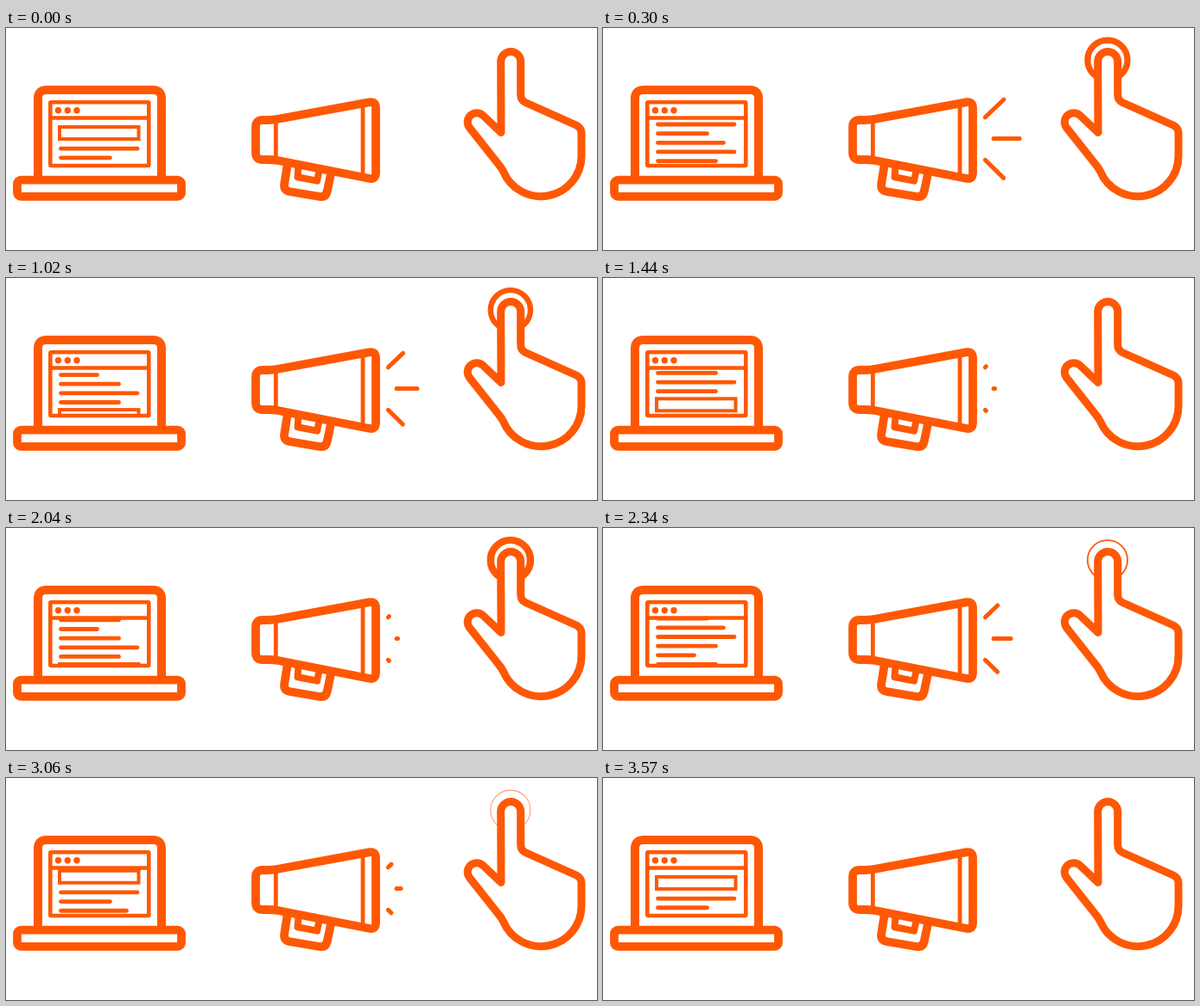
An HTML page that plays this animation: 684 px wide and 258 px high, repeating every 3.6 s.

```html
<!DOCTYPE html>
<html lang="en">
<head>
<meta charset="utf-8">
<title>Laptop, megaphone and tap</title>
<style>
  html, body { margin: 0; width: 100%; height: 100%; overflow: hidden; background: #fff; }
  svg { display: block; width: 684px; height: 258px; }
</style>
</head>
<body>
<svg viewBox="0 0 684 258" fill="none" stroke="#fe5804" stroke-linejoin="round">
  <clipPath id="screen"><rect x="53" y="105" width="111" height="54"/></clipPath>

  <g id="laptop">
    <path d="M37 176V82Q37 72 47 72H170Q180 72 180 82V176" stroke-width="10"/>
    <rect x="13" y="176.6" width="190" height="19.3" rx="4.5" stroke-width="9.8"/>
    <g clip-path="url(#screen)"><g id="page" stroke-width="4.8" stroke-linecap="round"></g></g>
    <rect x="51.3" y="86.3" width="114" height="73.7" rx="1" stroke-width="4.6"/>
    <path d="M51 104.5H165.5" stroke-width="4.6"/>
    <g fill="#fe5804" stroke="none">
      <circle cx="60.5" cy="95.7" r="3.7"/>
      <circle cx="71.3" cy="95.7" r="3.7"/>
      <circle cx="82" cy="95.7" r="3.7"/>
    </g>
  </g>

  <g id="megaphone">
    <path d="M326 157L322.2 181Q321 188.5 328 190L363 196Q370 197 371.7 190L376.3 168" stroke-width="9.8"/>
    <path d="M338.5 160L337.5 173.3L360 177.6L362.5 166" stroke-width="8"/>
    <path d="M297 107H303Q309 107 315 105.8L420 86.4Q428 85 428 93V168Q428 176.4 420 174.8L315 154Q309 153 303 153H297Q289 153 289 145V115Q289 107 297 107Z" fill="#fff" stroke-width="9.8"/>
    <path d="M312.3 106V154M413 88V173" stroke-width="4.8"/>
    <path id="rays" stroke-width="5" stroke-linecap="round"/>
  </g>

  <g id="tap">
    <g id="rings"></g>
    <path d="M572.7 39A11.5 11.5 0 0 1 595.7 39V77Q595.7 84 601 86.5L660 113Q666 116 666 122V148.7A47 47 0 0 1 575.6 166.7Q573.5 162.5 570.5 159L536.3 115.6A10.6 10.6 0 0 1 552 101.5L573 121.5Z" fill="#fff" stroke-width="9"/>
  </g>
</svg>
<script>
const STEP = 36, COUNT = 100, HALF = 50;
const $ = id => document.getElementById(id);

function add(parent, tag, attrs) {
  const el = document.createElementNS('http://www.w3.org/2000/svg', tag);
  for (const k in attrs) el.setAttribute(k, attrs[k]);
  return parent.appendChild(el);
}

// Page content: one box, then text lines of these right ends, repeated
const PAGE = 119, PITCH = 10.65, TRAVEL = 97;
const lineEnds = [152, 120.5, 139.5, 152, 130.5, 105.5, 130.5, 152, 130.5];
for (const top of [122, 122 + PAGE]) {
  add($('page'), 'rect', { x: 62, y: top - 7, width: 91.5, height: 14, 'stroke-width': 4, 'stroke-linejoin': 'miter' });
  lineEnds.forEach((x, i) => {
    const y = top + 18.2 + i * PITCH;
    add($('page'), 'path', { d: `M63.5 ${y}H${x}` });
  });
}

const rings = [0, 19].map(start => ({
  start, el: add($('rings'), 'circle', { cx: 583.9, cy: 37.2 })
}));

function bezier(x1, y1, x2, y2) {
  const at = (a, b, t) => 3 * a * t * (1 - t) ** 2 + 3 * b * t * t * (1 - t) + t ** 3;
  return x => {
    let lo = 0, hi = 1;
    for (let i = 0; i < 24; i++) {
      const mid = (lo + hi) / 2;
      if (at(x1, x2, mid) < x) lo = mid; else hi = mid;
    }
    return at(y1, y2, lo);
  };
}
const glide = bezier(.25, .43, .45, .98);

function drawPage(f) {
  const e = glide((f % HALF) / HALF);
  const y = TRAVEL * (f < HALF ? e : 1 - e);
  $('page').setAttribute('transform', `translate(0 ${-y})`);
}

// [time, ray length], joined with cosine easing
const pulses = [[0, 0], [9, 31], [16, 7], [18, 1.5], [26, 25], [40, 1.5], [48, 31],
  [56, 1.5], [66, 20.5], [74, 1.5], [80, 31], [85, 5], [88, 0], [100, 0]];
const origins = [[442.3, 103.8, .72, -.69], [452, 128.4, 1, 0], [442.3, 153.3, .71, .7]];

function rayLength(f) {
  const i = pulses.findIndex(p => p[0] > f);
  const [t0, a] = pulses[i - 1], [t1, b] = pulses[i];
  return a + (b - a) * (1 - Math.cos(Math.PI * (f - t0) / (t1 - t0))) / 2;
}

function drawRays(f) {
  const len = rayLength(f);
  $('rays').setAttribute('d', len < .5 ? '' : origins.map(([x, y, dx, dy]) =>
    `M${x} ${y}l${dx * len} ${dy * len}`).join(''));
}

function drawRings(f) {
  for (const { start, el } of rings) {
    const p = f % HALF - start;
    const on = p > 0 && p < 17;
    el.style.display = on ? '' : 'none';
    if (!on) continue;
    const grow = Math.min(p / 6, 1), left = 17.4 - p;
    el.setAttribute('r', 5 + 18.1 * (1 - (1 - grow) ** 2));
    el.setAttribute('stroke-width', 8.4 * Math.min(1, left / 11));
    el.setAttribute('opacity', Math.min(1, left / 2.4));
  }
}

function draw(ms) {
  const f = Math.floor(ms / STEP) % COUNT;
  drawPage(f);
  drawRays(f);
  drawRings(f);
}

let begin = null;
function tick(now) {
  if (begin === null) begin = now;
  draw(Math.max(0, now - begin));
  requestAnimationFrame(tick);
}
draw(0);
requestAnimationFrame(tick);
</script>
</body>
</html>
```
